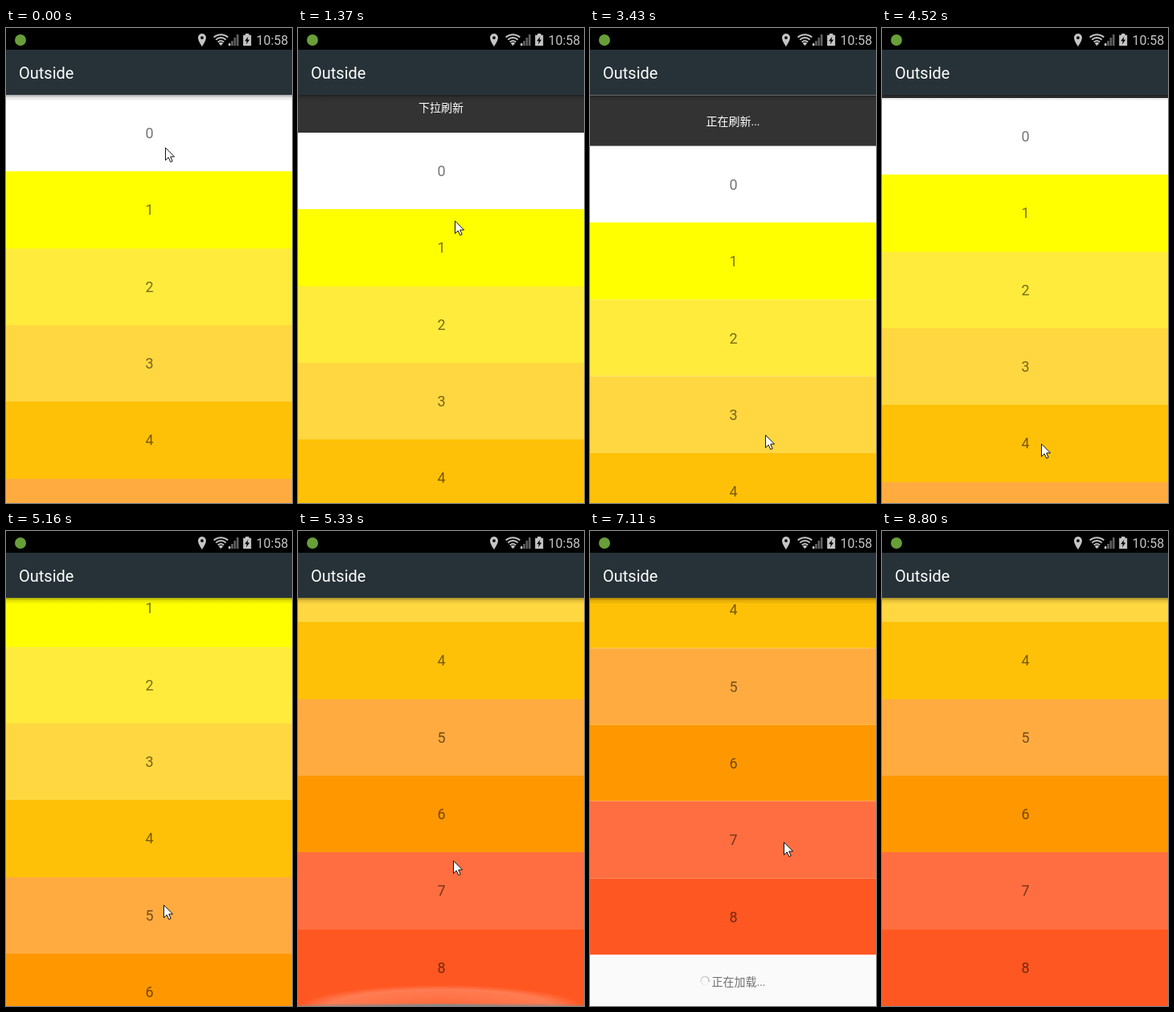
Recreate the animation shown at these times as an HTML page. Size 356 by 590 pixels, loop 9090 ms.

```html
<!DOCTYPE html>
<html lang="zh">
<head>
<meta charset="utf-8">
<title>Pull to refresh</title>
<style>
  html, body { margin: 0; width: 100%; height: 100%; overflow: hidden; background: #fff; }
  body { position: relative; font-family: Roboto, "Noto Sans CJK SC", "Noto Sans CJK", sans-serif; }
  #status, #bar, #view, #cursor, #glow { position: absolute; left: 0; }
  #status { top: 0; width: 356px; height: 27px; background: #000; }
  #status text { font-size: 16px; }
  #bar {
    top: 27px; width: 340px; height: 56px; padding-left: 16px;
    background: #263238; color: #fff; font-size: 20px; line-height: 58px;
  }
  #view { top: 83px; width: 356px; height: 507px; overflow: hidden; background: #fff; }
  #view::after {
    content: ""; position: absolute; top: 0; left: 0; width: 100%; height: 7px;
    background: linear-gradient(rgba(0,0,0,.36), rgba(0,0,0,.1) 50%, rgba(0,0,0,.03));
  }
  #list { position: absolute; top: 0; left: 0; width: 356px; }
  .row {
    height: 95.333px; line-height: 96px; text-align: center;
    font-size: 18px; color: rgba(0,0,0,.54); text-indent: 1px;
  }
  .end {
    position: absolute; left: 0; width: 356px; height: 63.5px; font-size: 14px;
    display: flex; align-items: center; justify-content: center;
  }
  #head { bottom: 100%; background: #333; color: #fff; }
  #foot { top: 100%; background: #fafafa; color: #707070; }
  #spin {
    width: 12px; height: 12px; margin-right: 2px; border-radius: 50%;
    background: conic-gradient(rgba(0,0,0,0), rgba(0,0,0,.26));
    -webkit-mask: radial-gradient(circle, transparent 4px, #000 4.6px);
    mask: radial-gradient(circle, transparent 4px, #000 4.6px);
  }
  #glow { bottom: 0; }
  #cursor { top: 0; }
</style>
</head>
<body>
<div id="view">
  <div id="list">
    <div id="head" class="end"></div>
    <div id="foot" class="end"><i id="spin"></i><span>正在加载...</span></div>
  </div>
  <svg id="glow" width="356" height="30">
    <defs>
      <radialGradient id="haze">
        <stop offset="0" stop-color="#fff" stop-opacity=".1"/>
        <stop offset=".8" stop-color="#fff" stop-opacity=".22"/>
        <stop offset="1" stop-color="#fff" stop-opacity="0"/>
      </radialGradient>
      <linearGradient id="edge">
        <stop offset="0" stop-color="#888" stop-opacity=".2"/>
        <stop offset=".5" stop-color="#888"/>
        <stop offset="1" stop-color="#888" stop-opacity=".2"/>
      </linearGradient>
    </defs>
    <ellipse cx="178" cy="32" rx="178" ry="28" fill="url(#haze)"/>
    <rect y="27.5" width="356" height="2.5" fill="url(#edge)"/>
  </svg>
</div>

<svg id="status" width="356" height="27" fill="#c4c4c4">
  <circle cx="18" cy="15" r="7" fill="#689f38"/>
  <path fill-rule="evenodd" d="M244 7a5 5 0 0 0-5 5c0 4 5 11 5 11s5-7 5-11a5 5 0 0 0-5-5m0 3.2a1.9 1.9 0 1 1 0 3.8a1.9 1.9 0 0 1 0-3.8"/>
  <g fill="none" stroke="#c4c4c4" stroke-width="2">
    <path d="M258.7 11.6a13 13 0 0 1 17.6 0M261.3 14.6a9 9 0 0 1 12.4 0M263.8 17.4a5.4 5.4 0 0 1 7.4 0"/>
  </g>
  <path d="M264.8 19a4 4 0 0 1 5.4 0l-2.7 3z"/>
  <path d="M277 19h2.4v3H277z"/>
  <path d="M280.2 16h2.6v6h-2.6zM283.6 12h2.6v10h-2.6zM287 8h2.6v14H287z" fill="#606060"/>
  <path d="M298 7h4.500v1.800h2.700V22h-10V8.800h2.800z"/>
  <path d="M301.500 10.500l-4.300 5.800h2.600l-.9 4.200 4.300-5.900h-2.600z" fill="#000"/>
  <text x="311.500" y="21">10:58</text>
</svg>
<div id="bar">Outside</div>

<svg id="cursor" width="13" height="20">
  <path d="M.5.7V16.300L4.200 12.800 6.800 18.500 9.200 17.400 6.700 11.900H11.600Z" fill="#fff" stroke="#111"/>
</svg>

<script>
const LOOP = 9090, STEP = 90, END = 63.5, BOTTOM = -351;
const colors = ["#fff", "#ff0", "#ffeb3b", "#ffd740", "#ffc107", "#ffab40", "#ff9800", "#ff6e40", "#ff5722"];
const $ = id => document.getElementById(id);
const list = $("list"), head = $("head"), cursor = $("cursor"), glow = $("glow"), spin = $("spin");

colors.forEach((color, i) => {
  const row = document.createElement("div");
  row.className = "row";
  row.style.background = color;
  row.textContent = i;
  list.append(row);
});

// time, x, y of the pointer
const path = [
  [0, 198, 148], [450, 198, 148], [560, 198, 137], [740, 198, 137],
  [1370, 195, 239], [2270, 195, 393], [2620, 195, 420], [3300, 219, 498],
  [3610, 216, 513], [3980, 206, 515], [4250, 198, 516], [4980, 198, 516],
  [5330, 193, 409], [5600, 196, 440], [5960, 200, 342], [6500, 208, 264],
  [6950, 212, 264], [7130, 241, 386], [7400, 300, 530], [7580, 318, 592]
];
const glowKeys = [[5240, 0], [5330, 1], [5420, .85], [5780, 0]];

function track(keys, t) {
  const i = keys.findIndex(k => k[0] > t);
  if (i < 0) return keys[keys.length - 1].slice(1);
  if (!i) return keys[0].slice(1);
  const a = keys[i - 1], b = keys[i], u = (t - a[0]) / (b[0] - a[0]);
  return a.slice(1).map((v, n) => v + (b[n + 1] - v) * u);
}

// resistance grows with the distance pulled
const pull = d => 494 * (1 - Math.exp(-Math.max(0, d) / 988));

// cubic ease-out
function settle(from, to, t, start, length) {
  const left = 1 - Math.min(1, Math.max(0, (t - start) / length));
  return to + (from - to) * left ** 3;
}

function offset(t, y) {
  if (t < 2290) return t < 740 ? 0 : pull(y - 140);
  if (t < 4110) return settle(113, END, t, 2290, 330);
  if (t < 4990) return settle(END, 0, t, 4110, 681);
  if (t < 5600) return BOTTOM * Math.min(1, (t - 4990) / 310) ** 1.5;
  if (t < 6550) return BOTTOM - pull(440 - y);
  if (t < 8170) return BOTTOM - settle(pull(176), END, t, 6550, 350);
  return BOTTOM - settle(END, 0, t, 8170, 600);
}

function draw(now) {
  const t = Math.floor(now % LOOP / STEP) * STEP + 20;
  const [x, y] = track(path, t);
  const shift = offset(t, y);
  list.style.transform = `translateY(${Math.round(shift * 2) / 2}px)`;
  head.textContent = t >= 2290 ? "正在刷新..." : shift < END ? "下拉刷新" : "松开刷新";
  cursor.style.transform = `translate(${Math.round(x)}px, ${Math.round(y)}px)`;
  glow.style.opacity = track(glowKeys, t)[0];
  spin.style.transform = `rotate(${t * .36 + 60}deg)`;
  requestAnimationFrame(() => draw(performance.now() - start));
}
const start = performance.now();
draw(0);
</script>
</body>
</html>
```
